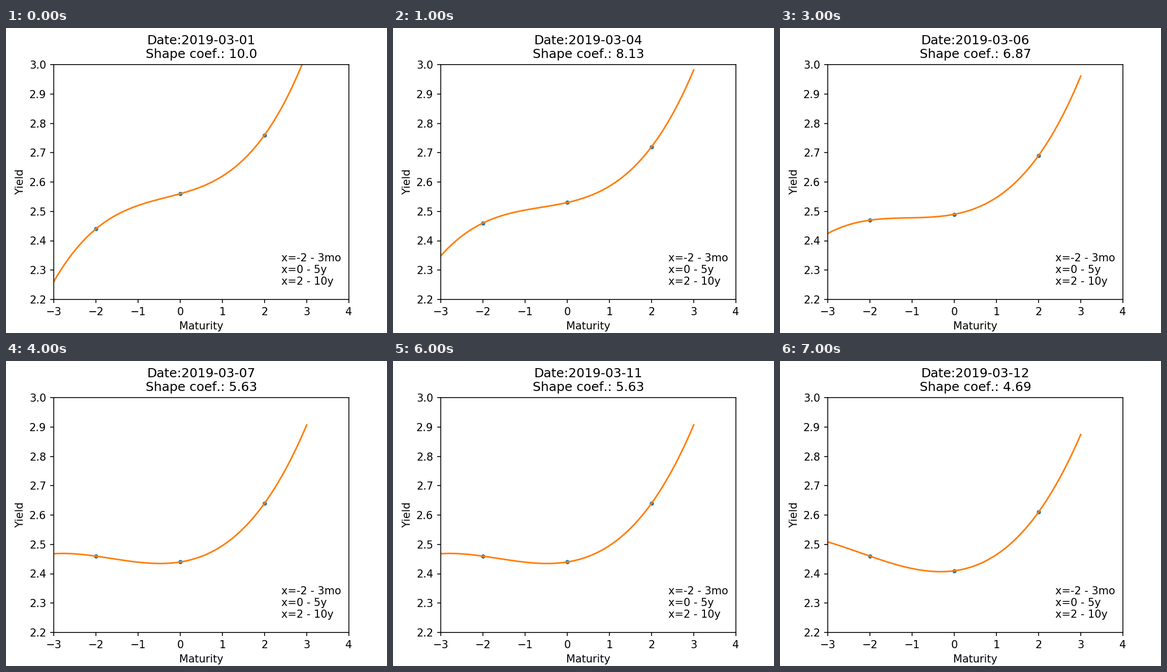
A matplotlib script for the animation above (8000 ms loop, 750 px wide and 600 px high).

```python
import numpy as np
import matplotlib.pyplot as plt
from matplotlib.animation import FuncAnimation

MID = [256, 253, 253, 249, 244, 242, 244, 241]  # 5y yield per day, hundredths
KNOTS = [-2, 0, 2]
X = np.linspace(-3, 3, 301)

plt.rcParams["font.family"] = "DejaVu Sans"
plt.rcParams["text.kerning_factor"] = 6
fig, ax = plt.subplots(figsize=(5, 4), dpi=150)
ax.set(xlim=(-3, 4), ylim=(2.2, 3.0), xlabel="Maturity", ylabel="Yield")
ax.set_xticks(range(-3, 5))
ax.set_yticks(np.linspace(2.2, 3.0, 9))
ax.text(2.4, 2.25, "x=-2 - 3mo\nx=0 - 5y\nx=2 - 10y")
dots, = ax.plot([], [], ".", color="C0")
curve, = ax.plot([], [], color="C1")
title = ax.set_title("")


def march_day(i):
    """The i-th business day, starting on Friday the 1st."""
    return 1 + i + 2 * ((i + 4) // 5)


def yields_on(i):
    """Yields at the knots: the short end drifts, the long end rides on the middle."""
    low = np.interp(i, [0, 1, 3, 5], [244, 246, 247, 246]) // 1
    spread = np.interp(i, [0, 1, 2, 3], [20, 19, 19, 20])
    return low / 100, MID[i] / 100, (MID[i] + spread) / 100


def cubic(low, mid, high):
    """Cubic through the three knots; returns the curve and its x^3 factor."""
    d = (high - low) / 32
    c = (low + high - 2 * mid) / 8
    return mid + 4 * d * X + c * X**2 + d * X**3, d


def update(i):
    yields = yields_on(i)
    y, d = cubic(*yields)
    dots.set_data(KNOTS, yields)
    curve.set_data(X, y)
    coef = round(float(d) * 1000, 2)
    title.set_text(f"Date:2019-03-{march_day(i):02d}\nShape coef.: {coef}")
    return dots, curve, title


anim = FuncAnimation(fig, update, frames=len(MID), interval=1000, repeat=True)
plt.show()
```
